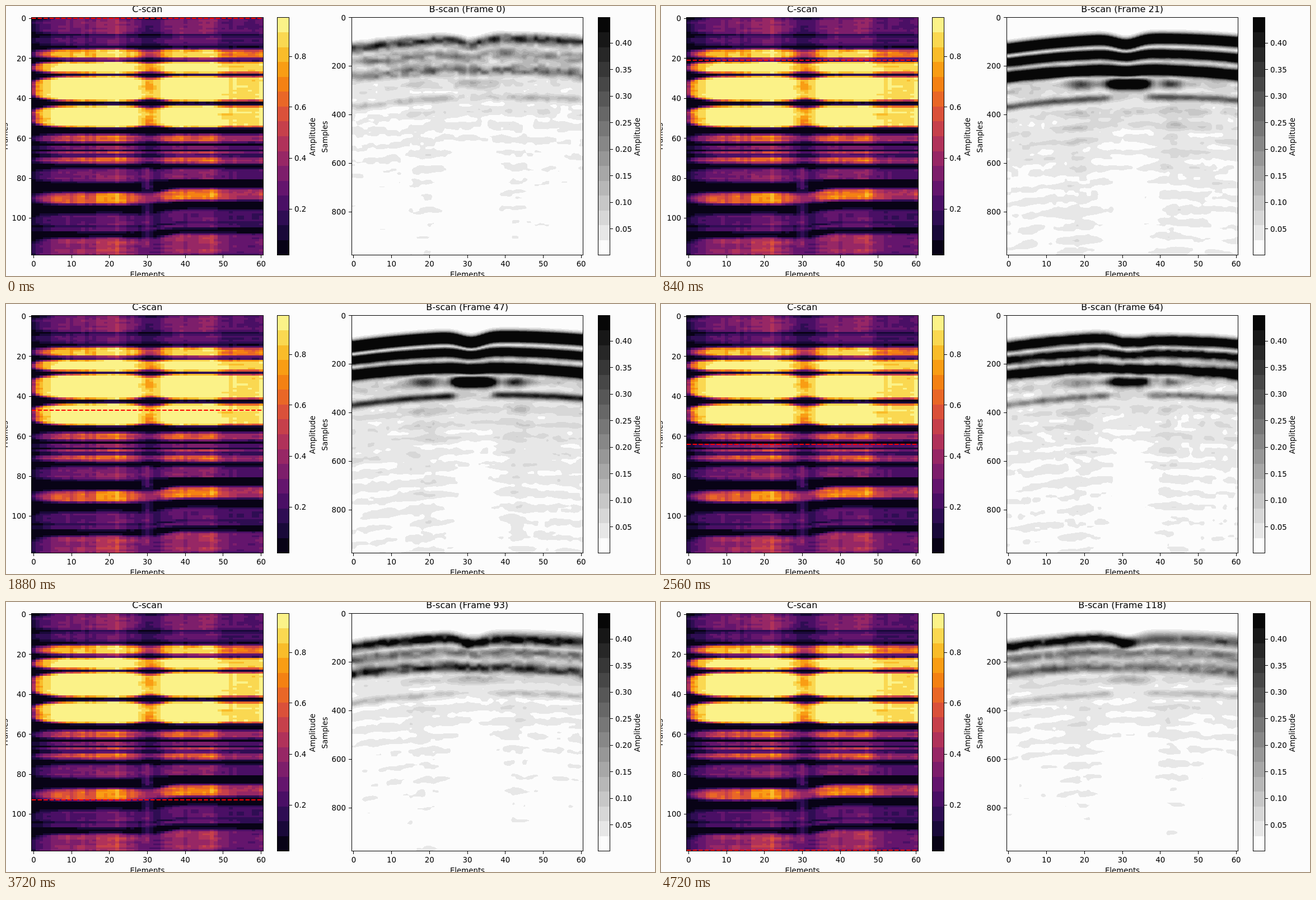
An HTML page with a canvas that plays this animation: 1159x483 px, repeating every 4760 ms.

```html
<!DOCTYPE html>
<html lang="en">
<head>
<meta charset="utf-8">
<title>C-scan and B-scan</title>
<style>
html, body { margin: 0; width: 100%; height: 100%; overflow: hidden; background: #fcfcfc; }
canvas, svg { position: absolute; left: 0; top: 0; width: 1159px; height: 483px; display: block; }
text { font-family: "DejaVu Sans", Verdana, sans-serif; font-size: 13.33px; fill: #000; }
.title { font-size: 16px; }
</style>
</head>
<body>
<canvas id="stage" width="1159" height="483"></canvas>
<svg id="labels" viewBox="0 0 1159 483"></svg>
<script>
const ctx = document.getElementById('stage').getContext('2d');
const svg = document.getElementById('labels');
const COLS = 61, FRAMES = 119, STEP = 40, LEVELS = 16;
const TOP = 20.5, BOTTOM = 445.5, HEIGHT = 425, WIDTH = 413;
const ROW = HEIGHT / FRAMES;

const clamp = (v, a = 0, b = 1) => Math.max(a, Math.min(b, v));
const smooth = (v, a, b) => { const t = clamp((v - a) / (b - a)); return t * t * (3 - 2 * t); };
const bell = d => Math.exp(-d * d);
const mix = (a, b, t) => a + (b - a) * t;

function hash(x, y, z) {
  let h = Math.imul(x, 374761393) ^ Math.imul(y, 668265263) ^ Math.imul(z, 1274126177);
  h = Math.imul(h ^ (h >>> 13), 1103515245);
  h = Math.imul(h ^ (h >>> 15), 2246822519);
  return ((h ^ (h >>> 16)) >>> 0) / 4294967296;
}

// Smooth seeded noise, 0 to 1; z is time or a seed
function noise(x, y, z) {
  const i = Math.floor(x), j = Math.floor(y), k = Math.floor(z);
  const u = smooth(x - i, 0, 1), v = smooth(y - j, 0, 1), w = z - k;
  const plane = q => mix(mix(hash(i, j, q), hash(i + 1, j, q), u),
                         mix(hash(i, j + 1, q), hash(i + 1, j + 1, q), u), v);
  return w ? mix(plane(k), plane(k + 1), w) : plane(k);
}

// Colour scales, 16 flat steps each
const stops = ['000004', '210c4a', '57106e', '8a226a', 'bc3754', 'e45a31', 'f98e09', 'f9cb35', 'fcffa4']
  .map(h => [0, 2, 4].map(p => parseInt(h.slice(p, p + 2), 16)));
const inferno = [], gray = [];
for (let k = 0; k < LEVELS; k++) {
  const f = (k + 0.5) / 2, i = Math.floor(f);
  inferno.push(stops[i].map((v, p) => Math.round(mix(v, stops[i + 1][p], f - i))));
  gray.push(clamp(247 - 16 * k, 3, 231));
}
gray[0] = 252;
const css = c => `rgb(${c})`;

// C-scan: bands as [centre row, half height, strength]
const bands = [[3.5, 5.5, .29], [11, 3.6, .22], [17.6, 3.4, .9], [24.4, 4, 1.3], [35, 7.2, 1.5],
  [49, 6.4, 1.4], [60, 3.2, .52], [64.5, 1.8, .5], [67.2, 1.7, .62], [70.8, 2.8, .55],
  [78.5, 4.5, .28], [90, 4, .62], [101, 4.5, .22], [105.5, 2, .3], [115, 6.5, .36]];

const gain = c => 1 - 0.72 * Math.exp(-c / 4.5) + 0.3 * bell((c - 21.5) / 2.5)
  - 0.45 * bell((c - 30.5) / 4) + 0.15 * bell((c - 46) / 3) - 0.3 * smooth(c, 47.5, 49.5);

function scanValue(c, r) {
  const lens = 1 - 0.3 * Math.exp(-c / 4) - 0.12 * bell((c - 31) / 4);
  const lift = r > 80 ? 2 * smooth(c, 28, 40) : 0;
  let v = 0;
  for (const [mid, half, level] of bands)
    v = Math.max(v, level * smooth(half * lens - Math.abs(r + lift - mid), 0, 2.4));
  v = 0.05 + v * gain(c) * (0.9 + 0.2 * hash(c, 5, 1));
  if (r > 74) v += 0.18 * bell((c - 30) / 1.2) * noise(2, r / 4, 3);
  v *= 0.82 + 0.2 * noise(c / 3, r / 2, 7) + 0.16 * noise(c / 12, r, 9);
  return v < 0.7 ? v : 0.7 + 0.25 * (1 - Math.exp((0.7 - v) / 0.25));
}

const cscan = document.createElement('canvas');
cscan.width = WIDTH;
cscan.height = HEIGHT;

function paintScan() {
  const g = cscan.getContext('2d');
  for (let r = 0; r < FRAMES; r++) for (let c = 0; c < COLS; c++) {
    const k = clamp(Math.floor((scanValue(c, r) - 0.0187) / 0.934 * LEVELS), 0, 15);
    const x = Math.round(c * WIDTH / COLS), y = Math.round(r * ROW);
    g.fillStyle = css(inferno[k]);
    g.fillRect(x, y, Math.round((c + 1) * WIDTH / COLS) - x, Math.round((r + 1) * ROW) - y);
  }
}

// B-scan: each echo is a shallow bow with a dip in the middle
const echo = (c, top, centre, dip) => top + 0.0125 * (c - centre) ** 2 + dip * bell((c - 31) / 4);
const cols = Array.from({ length: COLS }, (_, c) => ({
  y1: echo(c, 57, 38, 10),
  y2: echo(c, 84, 35, 6),
  y3: echo(c, 113, 32, 3),
  y4: echo(c, 162, 38, 0),
  right: smooth(c, 31, 36),
  edge: 1 - smooth(c, 25, 28) * (1 - smooth(c, 35, 38)),
  shadow: bell((c - 32) / 6.5),
  streak: bell((c - 18.5) / 4) + bell((c - 42.5) / 3),
  spike: bell((c - 30) / 1.4),
  spot: Math.exp(-(((c - 31.5) / 5.5) ** 4))
}));

// Echo strengths and drift as the scan passes the bright zone
function strengths(n) {
  const bright = smooth(n, 14, 16) * (1 - smooth(n, 54, 76));
  const peak = bright * bell((n - 47) / 18);
  const late = smooth(n, 64, 75);
  const left = 0.33 + 0.57 * bright + 0.3 * peak + 0.15 * late;
  return {
    left,
    right: left * (1 - 0.45 * smooth(n, 80, 118)),
    a2: 0.09 + 0.62 * bright + 0.05 * late,
    a3: 0.11 + 0.75 * bright + 0.14 * bell((n - 85) / 22),
    aSpot: 0.07 + 0.7 * bright + 0.15 * peak,
    a4: 0.06 + 0.13 * bright + 0.12 * peak,
    haze: 0.05 + 0.033 * bright,
    weak: 1 - bright,
    shiftLeft: 4 * smooth(n, 66, 76),
    shiftRight: 10 * smooth(n, 52, 70),
    late
  };
}

const GRID = 214;
const field = new Float32Array(COLS * GRID);
const image = ctx.createImageData(WIDTH, HEIGHT);

function fillField(n) {
  const p = strengths(n);
  for (let c = 0; c < COLS; c++) {
    const q = cols[c];
    const shift = mix(p.shiftLeft, p.shiftRight, q.right);
    const e1 = q.y1 + shift, e2 = q.y2 + shift * 0.4, e3 = q.y3 + shift * 0.4;
    const a1 = mix(p.left, p.right, q.right);
    for (let j = 0; j < GRID; j++) {
      const y = TOP + j * 2;
      const fine = noise(c / 1.5, y / 7, n / 4), broad = noise(c / 5 + 40, y / 10, n / 7);
      const grain = 0.2 + 0.9 * fine + 0.7 * broad;
      let v = 0;
      if (y < 215) {
        const s = a1 * bell((y - e1) / 8.7) - p.a2 * bell((y - e2) / 7.8)
          + p.a3 * bell((y - e3) / 8.4)
          - p.aSpot * (q.spot + 0.3 * q.streak) * bell((y - 139) / 9)
          + p.a4 * q.edge * bell((y - q.y4) / 6);
        v = Math.abs(s) * (1 + p.weak * 0.7 * (fine - 0.5))
          + p.late * (0.18 * q.spike * bell((y - e1 - 4) / 10) + 0.1 * q.right * bell((y - q.y1) / 8));
      }
      if (y > e1) {
        const decay = 0.76 * Math.exp(-Math.max(0, y - 130) / 110) + 0.24;
        const shade = 1 - 0.5 * q.shadow * smooth(y, 190, 270);
        const ringing = 1 + 0.3 * Math.cos((y - q.y4) * Math.PI / 12.5);
        const streak = 1 + 0.4 * q.streak * smooth(y, 160, 200);
        v += p.haze * decay * grain * shade * ringing * streak * smooth(y, e1 + 4, e1 + 60);
        v += (0.03 + 0.05 * p.weak) * grain * smooth(y, e1, e1 + 16) * (1 - smooth(y, e3 - 4, e3 + 18));
      }
      field[j * COLS + c] = v;
    }
  }
}

function paintField() {
  const data = image.data;
  for (let y = 0, p = 0; y < HEIGHT; y++) {
    const j = y >> 1, v = (y & 1) / 2;
    for (let x = 0; x < WIDTH; x++, p += 4) {
      const f = clamp((x + 0.5) * COLS / WIDTH - 0.5, 0, COLS - 1.001);
      const i = Math.floor(f), u = smooth(f - i, 0, 1), k = j * COLS + i;
      const a = mix(field[k], field[k + 1], u);
      const b = mix(field[k + COLS], field[k + COLS + 1], u);
      const level = Math.min(15, Math.floor(mix(a, b, v) / 0.447 * LEVELS));
      data[p] = data[p + 1] = data[p + 2] = gray[level];
      data[p + 3] = 255;
    }
  }
  ctx.putImageData(image, 618, 21);
}

function label(str, x, y, anchor, turn, cls) {
  const el = document.createElementNS('http://www.w3.org/2000/svg', 'text');
  el.textContent = str;
  el.setAttribute('text-anchor', anchor);
  el.setAttribute('transform', `translate(${x} ${y})${turn ? ' rotate(-90)' : ''}`);
  if (cls) el.setAttribute('class', cls);
  svg.appendChild(el);
  return el;
}

const ticks = [];
const tickX = (x, y) => ticks.push([Math.round(x), Math.round(y), 1, 5]);
const tickY = (x, y) => ticks.push([Math.round(x), Math.round(y), 5, 1]);

function axisX(x0) {
  for (let v = 0; v <= 60; v += 10) {
    const x = x0 + (v + 0.5) * WIDTH / COLS;
    tickX(x - 0.5, 446);
    label(v, x, 466, 'middle');
  }
  label('Elements', x0 + WIDTH / 2, 485, 'middle');
}

function axisY(x0, max, step, place) {
  for (let v = 0; v <= max; v += step) {
    const y = place(v);
    tickY(x0 - 5, y - 0.5);
    label(v, x0 - 10, y + 5, 'end');
  }
}

function barAxis(x, from, to, step, digits, place) {
  for (let v = from; v < to; v += step) {
    const y = place(v);
    tickY(x, y - 0.5);
    label(v.toFixed(digits), x + 9, y + 5, 'start');
  }
}

function colorBar(x, w, colors) {
  for (let k = 0; k < LEVELS; k++) {
    const y = Math.round(BOTTOM - (k + 1) * HEIGHT / LEVELS);
    ctx.fillStyle = css(colors[k]);
    ctx.fillRect(x, y, w, Math.round(BOTTOM - k * HEIGHT / LEVELS) - y);
  }
}

function marker(n) {
  const y = Math.round(TOP + (n + 0.5) * ROW);
  ctx.strokeStyle = '#f00';
  ctx.lineWidth = 2;
  ctx.setLineDash([7.4, 3.2]);
  ctx.beginPath();
  ctx.moveTo(46, y);
  ctx.lineTo(459, y);
  ctx.stroke();
  ctx.setLineDash([]);
}

function draw(n) {
  ctx.fillStyle = '#fcfcfc';
  ctx.fillRect(0, 0, 1159, 483);
  ctx.drawImage(cscan, 46, 21);
  marker(n);
  fillField(n);
  paintField();
  colorBar(484, 22, inferno);
  colorBar(1057, 22, gray.map(g => [g, g, g]));
  ctx.strokeStyle = ctx.fillStyle = '#000';
  ctx.lineWidth = 1;
  for (const [x, w] of [[45.5, 414], [617.5, 413], [484.5, 21], [1057.5, 21]])
    ctx.strokeRect(x, TOP, w, HEIGHT);
  for (const t of ticks) ctx.fillRect(...t);
  heading.textContent = `B-scan (Frame ${n})`;
}

axisX(46);
axisX(617.5);
axisY(46, 100, 20, v => TOP + (v + 0.5) * ROW);
axisY(617, 800, 200, v => TOP + v * HEIGHT / 978);
barAxis(506, 0.2, 0.9, 0.2, 1, v => 454 - v * 455);
barAxis(1079, 0.05, 0.42, 0.05, 2, v => 446 - v * 949);
label('C-scan', 252.3, 11, 'middle', false, 'title');
label('Frames', 3, 233, 'middle', true);
label('Samples', 574, 234, 'middle', true);
label('Amplitude', 552, 234, 'middle', true);
label('Amplitude', 1132, 234, 'middle', true);
const heading = label('', 823.7, 11, 'middle', false, 'title');
paintScan();

const start = performance.now();
let shown = -1;
function tick() {
  const n = Math.floor((performance.now() - start) / STEP) % FRAMES;
  if (n !== shown) draw(shown = n);
  requestAnimationFrame(tick);
}
tick();
</script>
</body>
</html>
```
